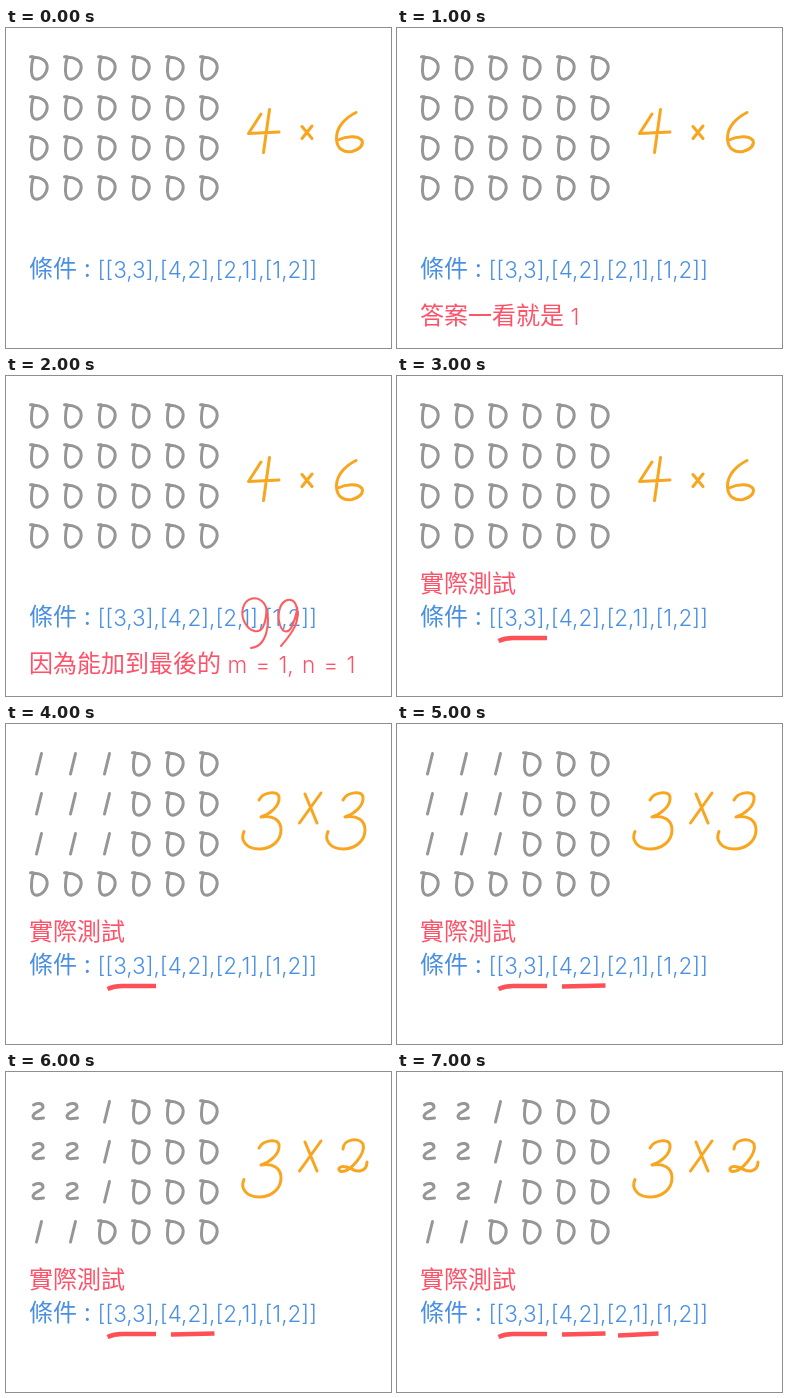
These frames come from a looping animation (385 px wide and 320 px high, 8 s). An HTML page:

```html
<!DOCTYPE html>
<html lang="zh-Hant">
<meta charset="utf-8">
<style>
  html, body { margin: 0; width: 100%; height: 100%; overflow: hidden; background: #fff }
  svg { display: block; width: 385px; height: 320px }
  path { fill: none; stroke-linecap: round; stroke-linejoin: round }
  .underline { stroke-linecap: butt }
  text { font: 24px "Noto Sans CJK TC", "Noto Sans CJK", sans-serif }
  .latin { font: 22.5px Inter, sans-serif; font-weight: 350; word-spacing: 2px }
</style>
<svg viewBox="0 0 385 320"></svg>
<script>
const svg = document.querySelector('svg');
const BLUE = '#4a90e2', RED = '#ff5168', ORANGE = '#f8a51f', GRAY = '#969696';

// Handwritten cell digits, relative to the cell corner
const digits = [
  'M1.5 1.8H4.5C2 9 .5 24.3 7.5 24.3C13 24.3 18.2 18 18.2 12C18.2 5.5 11 2 4.5 2.3',
  'M12.5 2.5L7.5 23',
  'M4.500 6C8 3.500 14 4 14 8C14 12 5 12 4 17C4 21 10 19.500 14.500 19'
];

const three = 'M253 76C257 68 272 66 273 73C274 82 264 90 255 93C267 91 275 96 275 106C275 118 264 125 253 125C240 125 234 116 238 107.500';
const times = 'M299 70L311 99M315 69L293.500 99';
const sizes = {
  '4x6': 'M255 86L242.500 105.500L273 104M263.500 81.500L257.500 124.500M296 98.500L306 110.500M306 98L296 110.500'
    + 'M350 84.500C341 89 330 98 330.500 111C331 121 338 125 346 123.500C353 122 358 117 356 112.500C352 107 340 108 332 112',
  '3x3': three + times,
  '3x2': three + times + 'M337 77C337 67 353 65 357 72C360 82 344 100 335 99.500C331 98 333 94 338 94.500C345 95 348 100 354 99C359 98 361 94 361 90'
};

const underlines = [
  'M101.500 265Q108 262 116 262H150',
  'M165 262.500L208.500 261.500',
  'M221 263.500L261.500 261.500'
];
const circles = 'M261 236C260 226 253 221 246 222.500C236 225 234 238 239 247C244 256 253 258 257 251C260 245 261 235 260 231C264 246 262 270 245 272'
  + 'M291 236C291 226 286 222 280 224.500C273 228 271 240 274 249C277 258 283 257 286 250C289 243 291 234 291 231C294 245 288 255 275 270';

const path = (d, color, width = 3, x = 0, y = 0, cls = '') =>
  `<path d="${d}" stroke="${color}" stroke-width="${width}" transform="translate(${x} ${y})" class="${cls}"/>`;
const text = (s, x, y, color, cls = '') => `<text x="${x}" y="${y}" fill="${color}" class="${cls}">${s}</text>`;

function grid(ops) {
  let out = '';
  for (let row = 0; row < 4; row++)
    for (let col = 0; col < 6; col++) {
      const value = ops.filter(([h, w]) => row < h && col < w).length;
      out += path(digits[value], GRAY, 3, 23 + 34 * col, 27 + 40 * row);
    }
  return out;
}

function draw(step) {
  const ops = [[3, 3], [4, 2]].slice(0, step < 4 ? 0 : step < 6 ? 1 : 2);
  const marks = step < 3 ? 0 : step < 5 ? 1 : step < 7 ? 2 : 3;
  let out = grid(ops) + path(sizes[['4x6', '3x3', '3x2'][ops.length]], ORANGE);
  if (ops.length === 1) out += path(three, ORANGE, 3, 84);
  out += text('條件', 23, 249, BLUE) + text(':', 78, 249, BLUE)
    + text('[[3,3],[4,2],[2,1],[1,2]]', 91.5, 250, BLUE, 'latin');
  if (step === 1) out += text('答案一看就是', 23, 296, RED) + text('1', 173.5, 297, RED, 'latin');
  if (step === 2) out += text('因為能加到最後的', 23, 296, RED)
    + text('m = 1, n = 1', 221.5, 297, RED, 'latin') + path(circles, '#ff5c60', 2);
  if (step > 2) out += text('實際測試', 23, 216, RED);
  for (const d of underlines.slice(0, marks)) out += path(d, '#ff5058', 4.5, 0, 0, 'underline');
  svg.innerHTML = out;
}

let shown = -1;
function tick() {
  const step = Math.floor(performance.now() % 8000 / 1000);
  if (step !== shown) draw(shown = step);
  requestAnimationFrame(tick);
}
tick();
</script>
</html>
```
